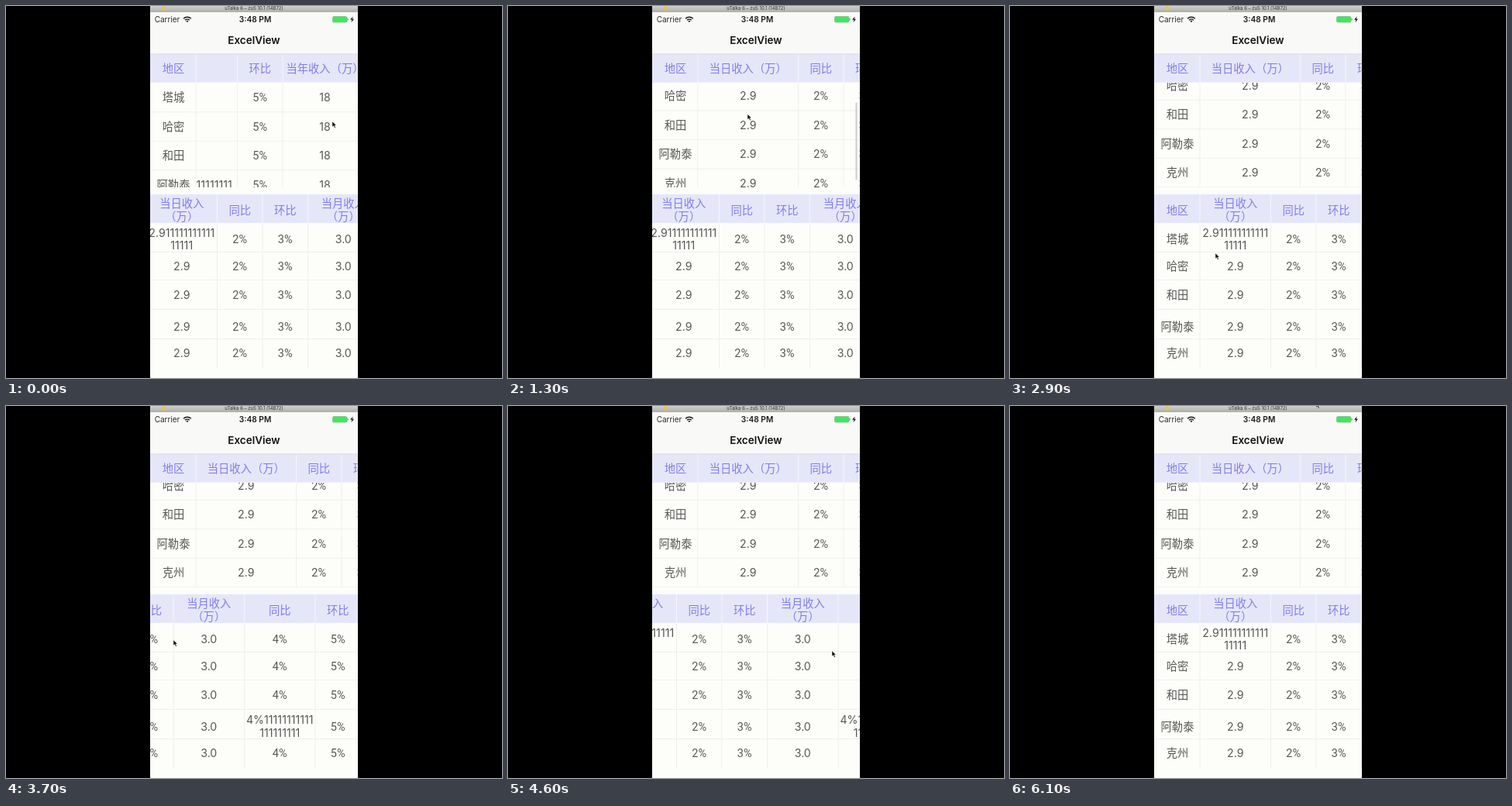
Animation of 640x480 px, one loop 6.2 s. Source, as an HTML page:

```html
<!DOCTYPE html>
<html lang="zh">
<head>
<meta charset="utf-8">
<style>
  html, body { margin: 0; width: 100%; height: 100%; overflow: hidden; background: #000; }
  svg { display: block; width: 640px; height: 480px; }
  text { font-family: Inter, "Noto Sans CJK SC", "Noto Sans CJK", sans-serif; text-anchor: middle; }
  .num { font-size: 14.2px; fill: #565654; }
  .pct { font: 14.5px Roboto, sans-serif; fill: #565654; }
  .cjk { font-size: 14.3px; fill: #565654; }
  .head { font-size: 14.3px; fill: #827ce8; }
  .split { stroke: #f5f5fb; stroke-width: 1; }
  .rule { stroke: #efeff1; stroke-width: 1; }
  .bar { fill: #e5e7f9; }
  .page { fill: #fdfdfa; }
</style>
</head>
<body>
<svg viewBox="0 0 640 480">
  <defs>
    <linearGradient id="chrome" x2="0" y2="1"><stop stop-color="#cfcfcc"/><stop offset="1" stop-color="#adadab"/></linearGradient>
    <clipPath id="phone"><rect x="186" width="268" height="480"/></clipPath>
    <clipPath id="topHead"><rect x="186" y="62" width="268" height="37"/></clipPath>
    <clipPath id="topBody"><rect x="186" y="99" width="268" height="135"/></clipPath>
  </defs>
  <rect width="640" height="480"/>
  <g clip-path="url(#phone)">
    <rect class="page" x="186" width="268" height="480"/>
    <rect x="186" y="8" width="268" height="54" fill="#f9f9f7"/>
    <rect x="186" width="268" height="8" fill="url(#chrome)"/>
    <circle cx="203" cy="3" r="2.6" fill="#f2c13c"/>
    <text x="320" y="5.2" font-size="6" fill="#333">uTalka 6 – zuS 10.1 (14B72)</text>

    <text x="208" y="21.2" font-size="10" fill="#2a2a2a">Carrier</text>
    <g fill="none" stroke="#1a1a1a" stroke-width="1.5">
      <path d="M229 16.2a7 7 0 0 1 9.8 0M231 18.3a4.2 4.2 0 0 1 5.8 0"/>
    </g>
    <path d="M232.5 19.4a2 2 0 0 1 2.8 0l-1.4 1.8z" fill="#1a1a1a"/>
    <text x="321.5" y="21.2" font-size="10.2" font-weight="600" fill="#1a1a1a">3:48 PM</text>
    <rect x="421.5" y="13.5" width="18.5" height="7.5" rx="1.5" fill="#3fe85f" stroke="#86b886" stroke-width=".7"/>
    <path d="M441 16v2.6" stroke="#777" stroke-width="1"/>
    <path d="M447.6 13.5l-3.4 4.3h2.1l-.8 3.4 3.5-4.5h-2.1z" fill="#1a1a1a"/>
    <text x="320" y="49" font-size="13.5" font-weight="600" fill="#111">ExcelView</text>

    <g clip-path="url(#topHead)">
      <rect class="bar" x="186" y="62" width="268" height="36.5"/>
      <g id="th"></g>
      <g id="fixHead"></g>
    </g>
    <g clip-path="url(#topBody)">
      <g id="tb"></g>
      <g id="fixBody"></g>
    </g>
    <path d="M186 62h268" stroke="#d9d9dc"/>
    <rect id="thumb" x="448.5" width="2" height="100" rx="1" fill="#999"/>

    <rect class="bar" x="186" y="243" width="268" height="37"/>
    <g id="bottom"></g>
    <path id="cursor" d="M0 0v7l1.7-1.5 1.4 2.8 1.2-.6-1.3-2.7h2.2z" fill="#111" stroke="#fff" stroke-width=".4"/>
  </g>
</svg>
<script>
const $ = id => document.getElementById(id);
const LOOP = 6200, STEP = 100, LEFT = 187, FIX = 245;
const places = ['塔城', '哈密', '和田', '阿勒泰', '克州'];
const heads = ['当日收入', '同比', '环比', '当月收入', '同比', '环比', '当年收入'];
const values = ['2.9', '2%', '3%', '3.0', '4%', '5%', '18'];
const ones = n => '1'.repeat(n);

// Long cells: [row, column] with their two wrapped parts
const long = { '0,0': ['2.9' + ones(11), ones(5)], '3,4': ['4%' + ones(11), ones(9)] };
const cell = (r, c) => long[[r, c]] || [values[c]];

const add = (parent, tag, attrs, content = '') => {
  const el = document.createElementNS('http://www.w3.org/2000/svg', tag);
  for (const k in attrs) el.setAttribute(k, attrs[k]);
  el.textContent = content;
  parent.append(el);
};
const label = (parent, cls, x, y, lines) => lines.forEach((s, i) =>
  add(parent, 'text', { class: cls, x, y: y + 5.2 + (i - (lines.length - 1) / 2) * 16.4 }, s));
const value = (parent, x, y, lines) =>
  label(parent, lines[0].endsWith('%') ? 'pct' : 'num', x, y, lines);
const line = (parent, cls, x1, y1, x2, y2) => add(parent, 'line', { class: cls, x1, y1, x2, y2 });

function buildTop() {
  const mid = r => 118 + 37.5 * r;
  const bottom = r => 136.8 + 37.5 * r;
  let x = FIX;
  [129.5, 58.5, 58.5, 109, 152, 58.5, 109].forEach((w, c) => {
    const cx = x + w / 2;
    label($('th'), 'head', cx, 80.5, [heads[c] + (heads[c].length > 2 ? '（万）' : '')]);
    places.forEach((_, r) => {
      value($('tb'), cx, mid(r), [cell(r, c).join('')]);
      line($('tb'), 'rule', x, bottom(r), x + w, bottom(r));
    });
    x += w;
    line($('th'), 'split', x, 62, x, 99);
    line($('tb'), 'rule', x, 99, x, 287);
  });
  const fb = $('fixBody'), fh = $('fixHead');
  add(fh, 'rect', { class: 'bar', x: 186, y: 62, width: 59, height: 36.5 });
  label(fh, 'head', 216, 80.5, ['地区']);
  line(fh, 'split', FIX, 62, FIX, 99);
  add(fb, 'rect', { class: 'page', x: 186, y: 90, width: 59, height: 200 });
  places.forEach((p, r) => {
    label(fb, 'cjk', 216, mid(r), [p]);
    line(fb, 'rule', LEFT, bottom(r), FIX, bottom(r));
  });
  line(fb, 'rule', FIX, 99, FIX, 287);
}

function buildBottom() {
  const g = $('bottom');
  const mids = [301, 335.7, 373, 413.3, 448];
  const rules = [317.5, 353.5, 391.5, 429.5];
  let x = LEFT;
  [58, 91.5, 58.5, 58.5, 91.5, 91.5, 58.5, 91.5].forEach((w, i) => {
    const cx = x + w / 2, c = i - 1;
    const name = i ? heads[c] : '地区';
    label(g, 'head', cx, 263.3, name.length > 2 ? [name, '（万）'] : [name]);
    mids.forEach((y, r) => i ? value(g, cx, y, cell(r, c)) : label(g, 'cjk', cx, y, [places[r]]));
    x += w;
    line(g, 'split', x, 243, x, 280);
    line(g, 'rule', x, 280, x, 467);
  });
  rules.forEach(y => line(g, 'rule', LEFT, y, x, y));
}

// Smooth curve through [time, value] keys without overshoot
function track(keys) {
  const slope = i => (keys[i + 1][1] - keys[i][1]) / (keys[i + 1][0] - keys[i][0]);
  const tangent = i => {
    if (i === 0 || i === keys.length - 1) return 0;
    const a = slope(i - 1), b = slope(i);
    return a * b > 0 ? 2 * a * b / (a + b) : 0;
  };
  return t => {
    if (t <= keys[0][0]) return keys[0][1];
    const i = keys.findIndex(k => k[0] > t) - 1;
    if (i < 0) return keys[keys.length - 1][1];
    const [t0, v0] = keys[i], [t1, v1] = keys[i + 1];
    const h = t1 - t0, u = (t - t0) / h, q = 1 - u;
    return q * q * (1 + 2 * u) * v0 + u * u * (3 - 2 * u) * v1 +
      h * u * q * (q * tangent(i) - u * tangent(i + 1));
  };
}

const topX = track([[0, 454], [700, 0]]);
const topY = track([[900, 0], [1500, 53]]);
const botX = track([[2000, 64], [2600, 0], [3100, 0], [3700, 237.5], [4100, 321], [4200, 321], [4600, 119], [5200, 0]]);
const thumbFade = track([[900, 0], [1000, .5], [1900, .4], [2300, 0]]);
const path = [
  [0, 421, 149], [300, 430, 155], [800, 309, 187], [900, 309, 187], [1400, 309, 134],
  [1900, 322, 311], [2000, 322, 311], [2500, 386, 315], [2900, 265, 319], [3150, 420, 310],
  [3700, 216, 302], [4150, 216, 308], [4600, 418, 316], [5100, 424, 300], [5600, 402, 253], [6100, 395, -5]
];
const curX = track(path.map(p => [p[0], p[1]]));
const curY = track(path.map(p => [p[0], p[2]]));

const move = (id, x, y) => $(id).setAttribute('transform', `translate(${x.toFixed(2)} ${y.toFixed(2)})`);

function draw(t) {
  const x = topX(t), y = topY(t);
  move('th', -x, 0);
  move('tb', -x, -y);
  move('fixBody', 0, -y);
  move('bottom', -botX(t), 0);
  move('thumb', 0, 101 + y * .6);
  $('thumb').setAttribute('opacity', thumbFade(t));
  move('cursor', curX(t), curY(t));
}

buildTop();
buildBottom();
const start = performance.now();
function tick() {
  const t = (performance.now() - start) % LOOP;
  draw(Math.floor(t / STEP) * STEP);
  requestAnimationFrame(tick);
}
tick();
</script>
</body>
</html>
```
